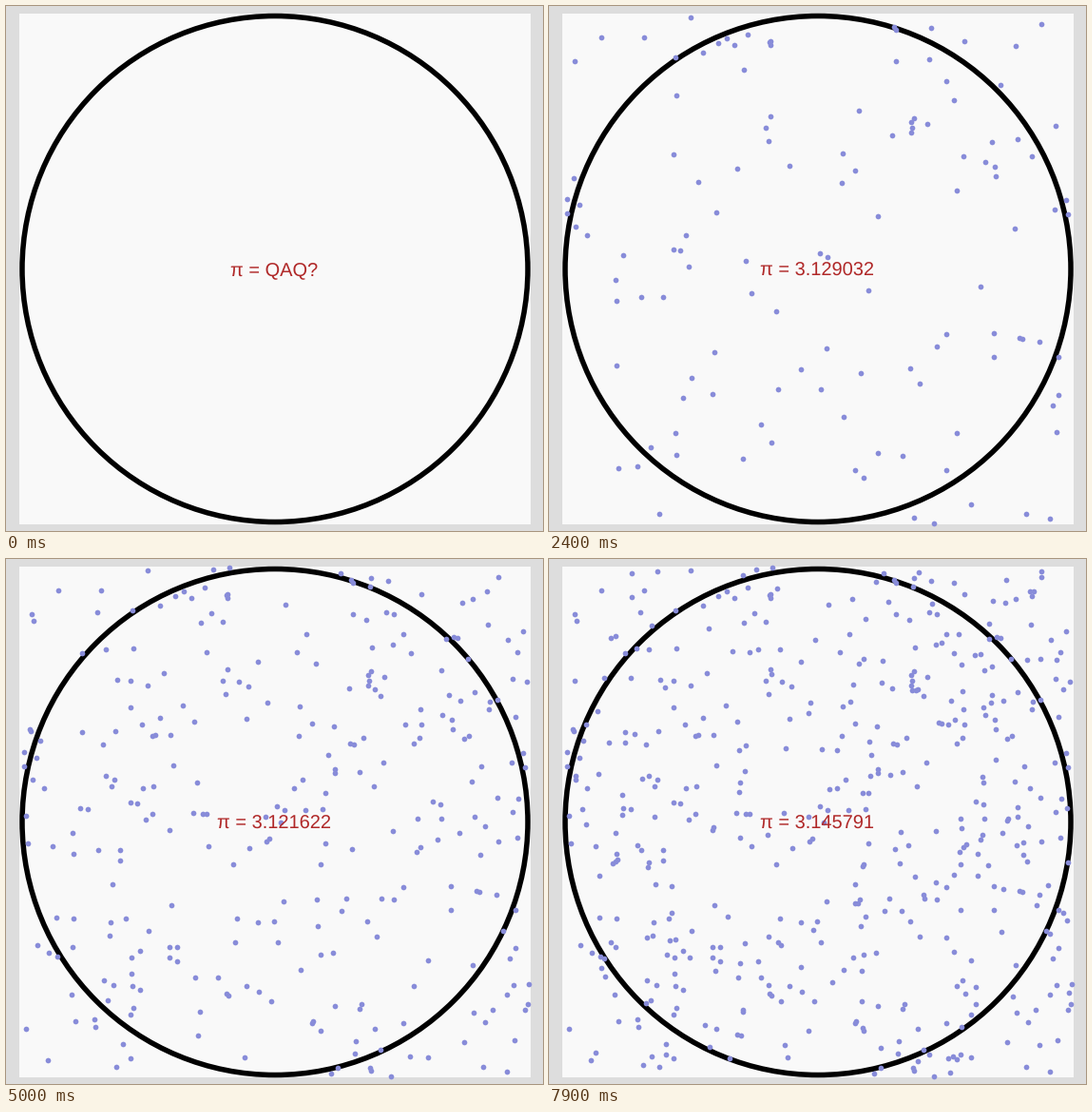
Recreate the animation shown at these times as a matplotlib script. Size 565x552 px, loop 8 s.

```python
import random

import matplotlib.pyplot as plt
from matplotlib.animation import FuncAnimation
from matplotlib.patches import Circle, Rectangle

W, H, DPI = 565, 552, 100
PX = 72 / DPI
LEFT, TOP, SIDE_X, SIDE_Y = 14, 8, 538, 537
CX, CY, R = 283, 276.5, 268.5
FRAMES, HOLD = 80, 4

# (step, points drawn, points inside the circle)
STAGES = [(0, 0, 0), (14, 84, 71), (27, 170, 128), (35, 223, 172),
          (46, 296, 231), (63, 407, 320), (75, 487, 383)]


def inside(p):
    return (p[0] - CX) ** 2 + (p[1] - CY) ** 2 <= R * R


def throw(rng, hit):
    """Random point of the square that does or does not hit the disc."""
    while True:
        p = (LEFT + SIDE_X * rng.random(), TOP + SIDE_Y * rng.random())
        if inside(p) == hit:
            return p


def make_points():
    rng = random.Random(314)
    points = []
    for (_, n0, k0), (_, n1, k1) in zip(STAGES, STAGES[1:]):
        hits = k1 - k0
        kinds = [True] * hits + [False] * (n1 - n0 - hits)
        rng.shuffle(kinds)
        points += [throw(rng, hit) for hit in kinds]
    return points


def count_at(step):
    for (s0, n0, _), (s1, n1, _) in zip(STAGES, STAGES[1:]):
        if step <= s1:
            return round(n0 + (n1 - n0) * (step - s0) / (s1 - s0))


points = make_points()

plt.rcParams["text.hinting"] = "none"
fig = plt.figure(figsize=(W / DPI, H / DPI), dpi=DPI, facecolor="#dddddd")
ax = fig.add_axes([0, 0, 1, 1])
ax.set_xlim(0, W)
ax.set_ylim(H, 0)
ax.axis("off")

ax.add_patch(Rectangle((LEFT, TOP), SIDE_X, SIDE_Y, fc="#f9f9f9", lw=0))
ax.add_patch(Circle((CX, CY), R - 2.5, fill=False, ec="black", lw=5.5 * PX,
                    zorder=2))
dots, = ax.plot([], [], "o", ms=5.7 * PX, mfc="#888cd9", mew=0, zorder=3)
label = ax.text(CX - 0.5, 284, "", family="Liberation Sans", size=20 * PX,
                color="#b02828", ha="center", va="baseline", zorder=4)


def draw(i):
    shown = points[:count_at(max(0, i - HOLD))]
    dots.set_data([x for x, _ in shown], [y for _, y in shown])
    if shown:
        label.set_text(f"π = {4 * sum(map(inside, shown)) / len(shown):.6f}")
    else:
        label.set_text("π = QAQ?")
    return dots, label


anim = FuncAnimation(fig, draw, frames=FRAMES, interval=100, repeat=True,
                     repeat_delay=0, init_func=lambda: draw(0))
plt.show()
```
